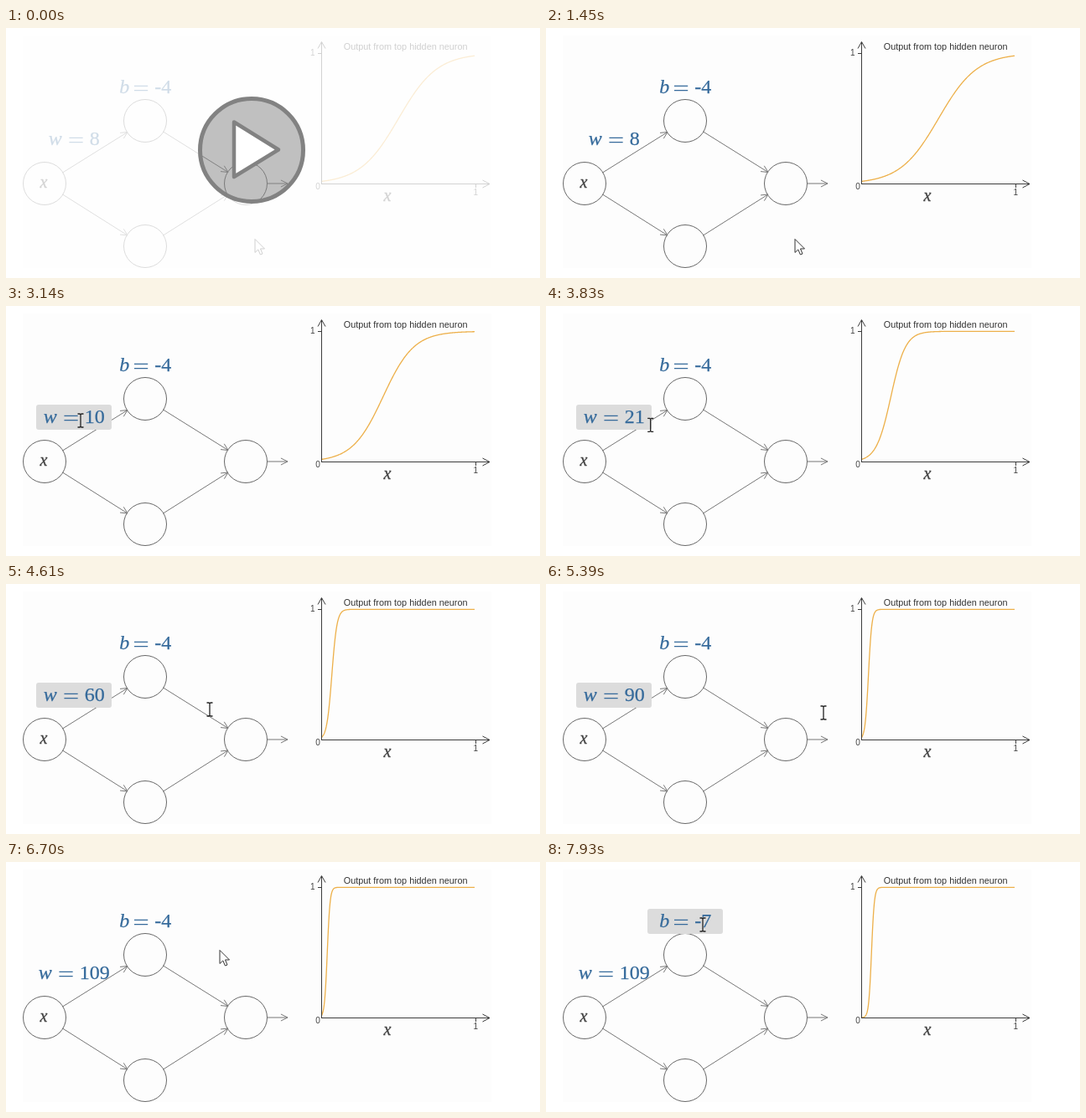
Recreate the animation shown at these times as an HTML page. Size 637 by 299 pixels, loop 8 s.

```html
<!DOCTYPE html>
<html lang="en">
<head>
<meta charset="utf-8">
<title>Weight and bias of a hidden neuron</title>
<style>
html, body { margin: 0; width: 100%; height: 100%; overflow: hidden; background: #fff; }
svg { display: block; width: 637px; height: 299px; }
.line { fill: none; stroke: #777; stroke-width: 1; }
.node { fill: #fdfdfd; stroke: #686868; stroke-width: 1; }
.axis { fill: none; stroke: #3c3c3c; stroke-width: 1; }
.label { font: 10.85px "Liberation Sans", Arial, sans-serif; fill: #333; }
.tick { font: 10px "Liberation Sans", Arial, sans-serif; fill: #444; }
.math { font: 24px "Liberation Serif", "Times New Roman", serif; fill: #356a9b; stroke: #356a9b; stroke-width: .25; }
.math path { fill: none; stroke-width: 1.2; }
.var { font: italic 20px "Liberation Serif", "Times New Roman", serif; fill: #444; stroke: #444; stroke-width: .35; }
.it { font-style: italic; }
</style>
</head>
<body>
<svg viewBox="0 0 637 299" xmlns="http://www.w3.org/2000/svg">
  <rect x="20" y="9" width="559" height="278" fill="#fdfdfd"/>
  <g id="net"></g>
  <rect id="boxW" x="36" y="118" width="90" height="30" rx="3"/>
  <rect id="boxB" x="121" y="56" width="90" height="30" rx="3"/>
  <g id="eqW" class="math"></g>
  <g id="eqB" class="math"></g>
  <text class="var" x="40.5" y="190.5">x</text>

  <path id="curve" fill="none" stroke="#edb04a" stroke-width="1.3"/>
  <path class="axis" d="M376.5 187V17M372 24.5L376.5 16.5 381 24.5M376 186.5H577M568.5 182L577 186.5 568.5 191M372 30.5H376M560.5 187V191"/>
  <text class="label" x="402.8" y="26">Output from top hidden neuron</text>
  <text class="tick" x="363" y="33">1</text>
  <text class="tick" x="369.3" y="193">0</text>
  <text class="tick" x="557.5" y="200">1</text>
  <text class="var" x="450.5" y="206.5">x</text>

  <path id="arrow" d="M0 .5V16.5L3.8 13 6.4 19 9 18 6.5 12H11.5Z" fill="#fff" stroke="#333" stroke-width="1"/>
  <path id="beam" d="M-3.5 -8H-1L0 -7 1 -8H3.5M0 -7V7M-3.5 8H-1L0 7 1 8H3.5" fill="none" stroke="#222" stroke-width="1.3"/>

  <g id="play">
    <path fill="#fff" fill-opacity=".77" fill-rule="evenodd" d="M0 0H637V299H0ZM231 146a62 62 0 1 0 124 0a62 62 0 1 0 -124 0Z"/>
    <circle cx="293" cy="146" r="61.5" fill="#8a8a8a" fill-opacity=".53" stroke="#828282" stroke-width="5"/>
    <path d="M272 112.5L325 145.5 272 178Z" fill="#fff" stroke="#828282" stroke-width="4.5" stroke-linejoin="round"/>
  </g>
</svg>
<script>
const LOOP = 8000, STEP = 77.1, START = 1442, PLAY_END = 590;
const $ = id => document.getElementById(id);
const show = (el, on) => el.setAttribute('visibility', on ? 'visible' : 'hidden');

// Pointer keys: step, x, y (arrow tip or beam centre)
const pointer = [
  [0, 297, 252], [3, 243, 224], [7, 140, 164], [10, 96, 140], [13, 79, 139], [17, 79, 139],
  [22, 89, 137], [28, 111, 141], [41, 243, 150], [51, 331, 154], [61, 391, 161], [62, 391, 161],
  [68, 255, 105], [72, 203, 80], [74, 194, 77], [82, 194, 77], [84, 187, 75]
];
const weight = [[17, 8], [22, 10], [28, 17], [41, 60], [51, 90], [61, 109]];
const bias = [[82, -4], [84, -7]];

// Monotone cubic through the keys
function track(keys, k, c = 1) {
  const n = keys.length - 1;
  if (k <= keys[0][0]) return keys[0][c];
  if (k >= keys[n][0]) return keys[n][c];
  const slope = i => (keys[i + 1][c] - keys[i][c]) / (keys[i + 1][0] - keys[i][0]);
  const tangent = i => {
    if (i === 0 || i === n) return slope(Math.min(i, n - 1));
    const a = slope(i - 1), b = slope(i);
    return a * b > 0 ? 2 * a * b / (a + b) : 0;
  };
  let i = 0;
  while (k > keys[i + 1][0]) i++;
  const h = keys[i + 1][0] - keys[i][0], u = (k - keys[i][0]) / h, v = 1 - u;
  return keys[i][c] * v * v * (1 + 2 * u) + keys[i + 1][c] * u * u * (3 - 2 * u)
    + h * u * v * (tangent(i) * v - tangent(i + 1) * u);
}

function link(x1, y1, x2, y2) {
  const a = Math.atan2(y2 - y1, x2 - x1);
  const wing = d => `${x2 - 9 * Math.cos(a + d)} ${y2 - 9 * Math.sin(a + d)}`;
  return `<path class="line" d="M${x1} ${y1}L${x2} ${y2}M${wing(.46)}L${x2} ${y2}L${wing(-.46)}"/>`;
}
$('net').innerHTML =
  [[46, 186], [166, 111], [166, 261], [286, 186]]
    .map(([x, y]) => `<circle class="node" cx="${x}" cy="${y}" r="25.5"/>`).join('') +
  link(67.5, 173, 145, 124.5) + link(67.5, 199, 145, 248) +
  link(187.5, 124, 265, 172.5) + link(187.5, 248, 265, 199) + link(311.5, 186, 336, 186);

// Centred "name = value"
function equation(el, name, nameWidth, value, cx, y) {
  const text = String(value), gap = 6.7, sign = 18.7;
  const valueWidth = [...text].reduce((s, ch) => s + (ch === '-' ? 8 : 12), 0);
  const x = cx - (nameWidth + 2 * gap + sign + valueWidth) / 2;
  const eq = x + nameWidth + gap;
  const bar = dy => `M${eq + 1.2} ${y - dy}h16.2`;
  el.innerHTML = `<text class="it" x="${x + .5}" y="${y}">${name}</text>` +
    `<path d="${bar(8.6)}${bar(3.4)}"/><text x="${eq + sign + gap}" y="${y}">${text}</text>`;
}

function sigmoidPath(w, b) {
  let d = '';
  for (let px = 0; px <= 182.5; px += .5) {
    const s = 1 / (1 + Math.exp(-(w * px / 183.5 + b)));
    d += `${d ? 'L' : 'M'}${376.5 + px} ${(186.2 - 155.9 * s).toFixed(2)}`;
  }
  return d;
}

function highlight(box, pressed, x, y) {
  const left = +box.getAttribute('x'), top = +box.getAttribute('y');
  const hover = x >= left && x <= left + 90 && y >= top && y <= top + 30;
  box.setAttribute('fill', pressed ? '#dcdcdc' : '#ececec');
  show(box, pressed || hover);
}

let last = null;
function draw(t) {
  const k = Math.max(0, Math.floor((t - START) / STEP));
  const playing = t < PLAY_END;
  const state = k + '/' + playing;
  if (state === last) return;
  last = state;

  const x = track(pointer, k), y = track(pointer, k, 2);
  const w = Math.round(track(weight, k)), b = Math.round(track(bias, k));
  const beam = (k >= 18 && k <= 62) || k >= 83;
  show($('play'), playing);
  highlight($('boxW'), k >= 18 && k <= 62, x, y);
  highlight($('boxB'), k >= 78, x, y);
  equation($('eqW'), 'w', 17.2, w, 81, 140);
  equation($('eqB'), 'b', 10.3, b, 166, 78);
  $('curve').setAttribute('d', sigmoidPath(w, b));
  for (const id of ['arrow', 'beam']) {
    $(id).setAttribute('transform', `translate(${x.toFixed(1)} ${y.toFixed(1)})`);
    show($(id), (id === 'beam') === beam);
  }
}

const origin = performance.now();
function tick() {
  draw((performance.now() - origin) % LOOP);
  requestAnimationFrame(tick);
}
tick();
</script>
</body>
</html>
```
